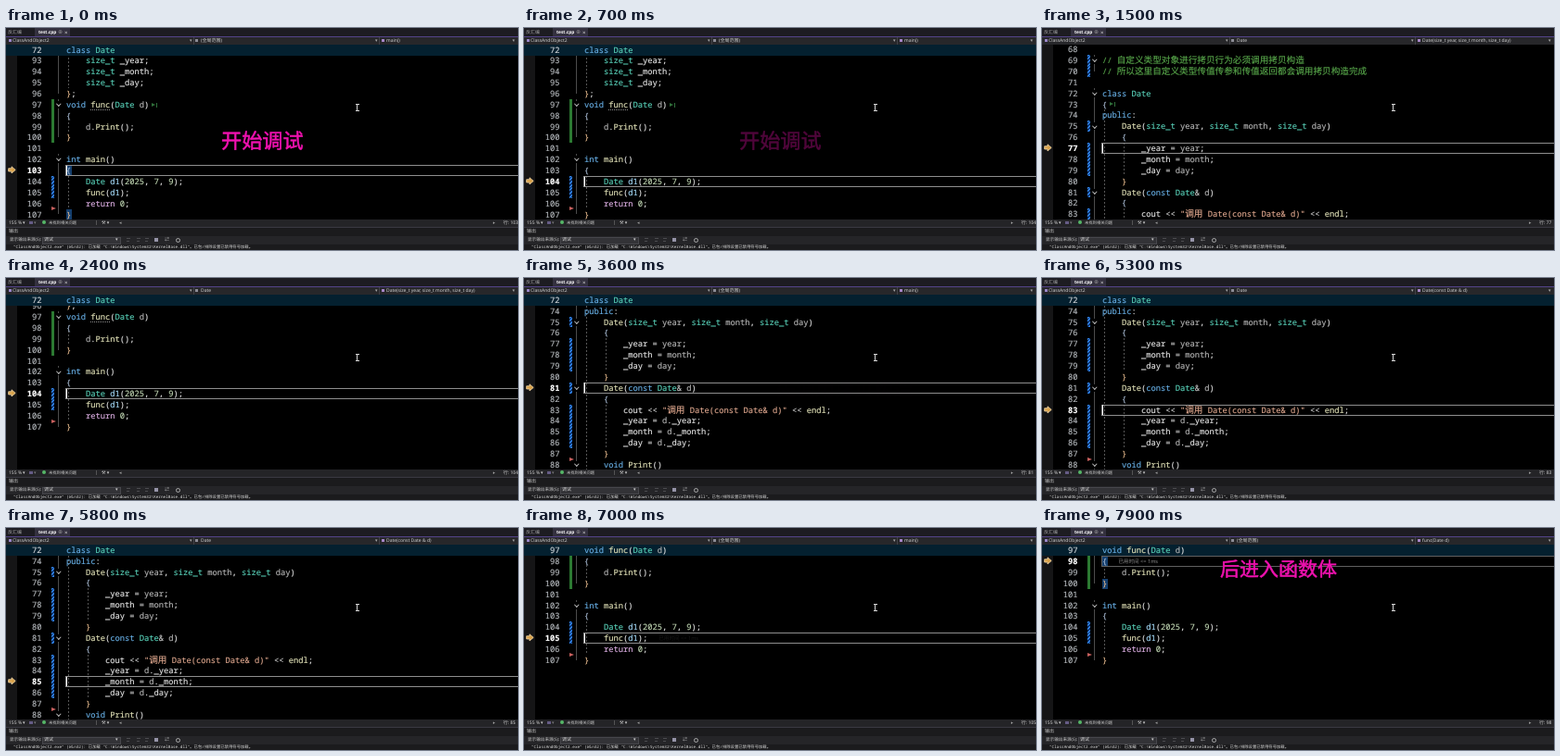
These frames come from a looping animation (552 px wide and 240 px high, 8000 ms). An HTML page:

```html
<!DOCTYPE html>
<html lang="zh-CN">
<head>
<meta charset="utf-8">
<title>Debugger stepping</title>
<style>
html, body { margin: 0; width: 100%; height: 100%; overflow: hidden; background: #000; }
#stage { position: relative; width: 552px; height: 240px; overflow: hidden; background: #000;
  text-rendering: geometricPrecision; -webkit-font-smoothing: antialiased; }
#stage div { position: absolute; white-space: pre; }
.code { font: 8.75px/13.8px "Noto Sans Mono", "Noto Sans CJK SC", monospace; color: #e4e4e4;
  -webkit-text-stroke: .15px; }
.cjk { font-size: 9.65px; line-height: 1px; }
.ui { font: 5px/8px "Noto Sans", "Noto Sans CJK SC", sans-serif; color: #cfcfcf; }
.num { left: 12px; width: 26.5px; text-align: right; color: #b4b8bc; }
.num.on { color: #fff; font-weight: 700; }
.kw { color: #67aee4; } .ty { color: #58d0b8; } .fn { color: #e2e2b8; } .ret { color: #dcaee2; }
.str { color: #dca58c; } .nu { color: #c2d8b4; } .com { color: #57a64a; } .par { color: #b4b4b4; }
.var { color: #a6dcfa; } .open { color: #a9bcd4; } .close { color: #e3b88c; } .op { color: #c4c4c4; }
.mod { left: 49px; width: 3px; background: repeating-linear-gradient(135deg, #2f7fe0 0 1.5px, #0c2f66 1.5px 2.6px); }
.mod.saved { background: #2c7a32; }
.out { left: 56px; width: 1px; background: #4c4c4c; }
.guide { width: 1px; background: repeating-linear-gradient(#565656 0 2px, transparent 2px 4px); }
.cap { color: #f012b0; font-family: "Noto Sans CJK SC", "Noto Sans", sans-serif; font-weight: 500;
  line-height: 26px; -webkit-text-stroke: .45px; text-shadow: 0 0 1px #50063c; }
</style>
</head>
<body>
<div id="stage"></div>
<script>
const LOOP = 8000, ROW = 11.87, COL = 5.25, X0 = 65, FIRST = 68;
const stage = document.getElementById('stage');

const source = `
// 自定义类型对象进行拷贝行为必须调用拷贝构造
// 所以这里自定义类型传值传参和传值返回都会调用拷贝构造完成

class Date
{
public:
    Date(size_t year, size_t month, size_t day)
    {
        _year = year;
        _month = month;
        _day = day;
    }
    Date(const Date& d)
    {
        cout << "调用 Date(const Date& d)" << endl;
        _year = d._year;
        _month = d._month;
        _day = d._day;
    }
    void Print()
    {
        cout << _year << endl;
    }
private:
    size_t _year;
    size_t _month;
    size_t _day;
};
void func(Date d)
{
    d.Print();
}

int main()
{
    Date d1(2025, 7, 9);
    func(d1);
    return 0;
}`.split('\n');

// view: anchor line, its centre y, sticky header line
const views = {
  main: [93, 35.3, 72], ctor: [68, 23.2, 0], back: [97, 42, 72],
  copy: [74, 35.6, 72], body: [98, 36, 97]
};

// start time, current line, view, scope
const steps = [
  [0, 103, 'main', 'main'], [700, 104, 'main', 'main'],
  [1000, 75, 'ctor', 'ctor'], [1300, 77, 'ctor', 'ctor'], [1600, 78, 'ctor', 'ctor'],
  [1800, 79, 'ctor', 'ctor'], [2000, 80, 'ctor', 'ctor'],
  [2200, 104, 'back', 'main'], [2800, 105, 'back', 'main'],
  [3400, 81, 'copy', 'copy'], [5300, 83, 'copy', 'copy'], [5500, 84, 'copy', 'copy'],
  [5700, 85, 'copy', 'copy'], [6000, 86, 'copy', 'copy'], [6200, 87, 'copy', 'copy'],
  [6600, 105, 'body', 'main'], [7200, 98, 'body', 'func']
];

const scopes = {
  main: ['(全局范围)', 'main()'], func: ['(全局范围)', 'func(Date d)'],
  ctor: ['Date', 'Date(size_t year, size_t month, size_t day)'],
  copy: ['Date', 'Date(const Date & d)']
};

// text, x, centre y, size, from, to
const captions = [
  ['开始调试', 232, 121, 22.2, -500, 800],
  ['先调用拷贝构造', 272, 120, 21, 3600, 5000],
  ['后进入函数体', 192, 43.5, 21, 7400, 8600]
];
const braces = { 103: 107, 98: 100 };

function add(parent, cls, x, y, w, h, text, css) {
  const el = document.createElement('div');
  el.className = cls;
  const put = (key, v) => { if (v != null) el.style[key] = v + 'px'; };
  put('left', x); put('top', y); put('width', w); put('height', h);
  if (text) el.textContent = text;
  if (css) el.style.cssText += css;
  parent.append(el);
  return el;
}
const fill = (x, y, w, h, color, parent = stage) => add(parent, '', x, y, w, h, '', 'background:' + color);
const label = (x, mid, text, css) => add(stage, 'ui', x, mid - 4, null, null, text, css);
const clamp = v => Math.max(0, Math.min(1, v));
const span = (cls, s) => `<span class="${cls}">${s}</span>`;
const escape = s => s.replace(/&/g, '&amp;').replace(/</g, '&lt;');
const wide = s => s.replace(/[\u4e00-\u9fff]+/g, m => span('cjk', m));

function classify(word, line, at) {
  const next = line[at + word.length];
  if (/^(class|public|private|const|void|int)$/.test(word)) return 'kw';
  if (word === 'return') return 'ret';
  if (word === 'size_t' || word === 'Date' && next !== '(') return 'ty';
  if (next === '(' && word !== 'd1' || word === 'endl') return 'fn';
  if (word === 'd1') return 'var';
  if (/^(d|year|month|day)$/.test(word)) return 'par';
  return /^\d/.test(word) ? 'nu' : '';
}

function paint(line) {
  return line.replace(/\/\/.*|".*?"|\w+|[{}]|[<&=]+/g, (m, at) => {
    const cls = m.startsWith('//') ? 'com' : m[0] === '"' ? 'str' :
      m === '{' ? 'open' : m === '}' ? 'close' : /\w/.test(m) ? classify(m, line, at) : 'op';
    return span(cls, wide(escape(m)));
  });
}

// editor
const editor = add(stage, '', 0, 18, 552, 188.5, '', 'overflow:hidden');
fill(0, 0, 12, 189, '#151516', editor);
const sheet = add(editor, '', 0, 0, 552, 480);
const rowTop = n => (n - FIRST) * ROW;

const block = (cls, a, b, x) => add(sheet, cls, x, rowTop(a), null, (b - a + 1) * ROW);
[[69, 70], [75, 75], [77, 79], [81, 81], [83, 86], [104, 105]].forEach(([a, b]) => block('mod', a, b));
block('mod saved', 97, 100);
[[69, 70], [72, 96], [97, 100], [102, 107]].forEach(([a, b]) => block('out', a, b - 0.5));
[[74, 95, 67], [98.8, 99, 67], [104, 106, 67], [77, 79, 88], [83, 86, 88], [90, 90, 88]]
  .forEach(([a, b, x]) => block('guide', a, b, x));

const marks = [0, 1].map(() => fill(X0 - 0.5, 0, 6, 11, '#153f6e', sheet));
const numbers = source.map((line, i) => {
  const y = i * ROW;
  add(sheet, 'code', X0, y, null, ROW).innerHTML = paint(line);
  return add(sheet, 'code num', null, y, null, ROW, String(FIRST + i));
});

[69, 72, 75, 81, 88, 97, 102].forEach(n => {
  fill(53, rowTop(n) + 2, 7, 8, '#000', sheet);
  add(sheet, '', 55, rowTop(n) + 3.2, 2.6, 2.6, '',
    'border:solid #b8b8b8;border-width:0 1px 1px 0;transform:rotate(45deg)');
});
[87, 106].forEach(n => add(sheet, '', 49, rowTop(n) + ROW - 2.2, 0, 0, '',
  'border:solid transparent;border-width:2.8px 0 2.8px 5px;border-left-color:#c8605e'));
add(sheet, '', X0 + 5 * COL, rowTop(97) + 11, 4 * COL, 0, '', 'border-top:1px dotted #8a8a8a');

const box = add(sheet, '', 64, 0, 492, 10, '', 'border:1px solid');
const caret = fill(64.5, 0, 1.2, 10.5, '#fff', sheet);
const tip = add(sheet, 'ui', 0, 0, null, null, '已用时间 <= 1ms', 'color:#8c8c8c;font-size:5.6px');
const runHere = add(sheet, '', 0, 0, 7, 6);
add(runHere, '', 0, 0, 0, 0, '', 'border:solid transparent;border-width:2.5px 0 2.5px 4px;border-left-color:#2f6f3a');
fill(5, 0, 1, 5, '#2f6f3a', runHere);

const arrow = add(sheet, '', 2, 0, 9, 9);
arrow.innerHTML = '<svg width="9" height="9" style="display:block"><path d="M.7 2.8H4V.8L8.2 4.4 4 8V6H.7Z" fill="#d9a24a" stroke="#f6dcae" stroke-width=".8"/></svg>';

const sticky = add(editor, 'code', 0, 0, 552, 11.8, '', 'background:#04202f;overflow:hidden');
const stickyNum = add(sticky, 'code num', null, 0, null, ROW, '', 'color:#d0d4d8');
const stickyText = add(sticky, 'code', X0, 0, null, ROW);

// tab strip and navigation bar
fill(0, 0, 552, 9, '#1d1c22');
fill(31, 0, 38, 9, '#34313f');
fill(0, 8.5, 552, 1, '#54458a');
label(2, 4.5, '反汇编', 'color:#a4a4a4');
label(35, 4.5, 'test.cpp', 'color:#fff;font-weight:700;font-size:4.8px');
label(56, 4.5, '⊕', 'color:#aaa');
label(63, 4.5, '×', 'color:#ddd;font-size:6px');
fill(0, 9.5, 552, 8.5, '#27272a');
label(7, 14, 'ClassAndObject2');
[[2.5, '#9a86c8'], [204, '#8b8b94'], [404.5, '#a686c8']].forEach(([x, c]) => fill(x, 12.2, 3.2, 3.2, c));
[199, 399, 547].forEach(x => label(x - 1, 14, '▾', 'color:#aaa'));
[201.5, 401.5].forEach(x => fill(x, 9.5, 1, 8.5, '#414146'));
const scopeText = label(210, 14, '');
const memberText = label(410, 14, '');

// editor status row
fill(0, 206.5, 552, 8.5, '#242427');
label(3, 210.5, '155 %');
label(18, 210.5, '▾');
fill(25, 208.7, 3.5, 3.5, '#655c86');
label(30, 210.5, '▾', 'color:#777');
add(stage, '', 39, 208.3, 4, 4, '', 'background:#55b767;border-radius:50%');
label(46, 210.5, '未找到相关问题', 'font-size:4.3px');
fill(97, 208, 1, 5, '#555');
label(103, 210.5, '⚒ ▾');
label(122, 210.5, '◂', 'color:#999');
label(525, 210.5, '▸', 'color:#999');
const position = label(536, 210.5, '');

// output panel
fill(0, 215, 552, 25, '#1b1b1d');
fill(0, 215, 552, 1, '#3a3942');
label(3, 220, '输出');
fill(0, 224.5, 552, 9, '#252528');
label(4, 229, '显示输出来源(S):', 'font-size:4.6px');
add(stage, '', 39, 225.5, 83, 6, '', 'background:#333337;border:1px solid #47474c');
label(41, 229, '调试');
label(118, 229, '▾');
[130, 141, 150].forEach(x => {
  fill(x, 227, 4, 1, '#4c4c50');
  fill(x, 229.5, 3, 1, '#4c4c50');
});
fill(160, 227, 4, 4, '#9694a8');
label(171, 229, '⇄', 'color:#bbb');
add(stage, '', 183, 226.8, 3, 3, '', 'border:1px solid #aaa;border-radius:50%');
label(8, 237, '"ClassAndObject2.exe" (Win32): 已加载 "C:\\Windows\\System32\\KernelBase.dll"。已包/排除设置已禁用符号加载。',
  'font-family:"Noto Sans Mono","Noto Sans CJK SC",monospace;font-size:4.35px;color:#e0e0e0');

// I-beam pointer
[[378, 82.5, 1, 7], [376.5, 82, 4, 1], [376.5, 89, 4, 1]].forEach(r => fill(...r, '#d8d8d8'));

const titles = captions.map(([text, x, y, size]) =>
  add(stage, 'cap', x, y - 13, null, null, text, `font-size:${size}px`));

const stepAt = t => steps.filter(s => s[0] <= Math.max(0, t)).pop();
const setText = (el, s) => { if (el.textContent !== s) el.textContent = s; };
const show = (el, on) => { el.style.visibility = on ? 'visible' : 'hidden'; };
let drawn = null;

function place(step) {
  const [, line, viewName] = step;
  const [anchor, mid, header] = views[viewName];
  const y = rowTop(line);
  sheet.style.top = mid - 18 - ROW / 2 - rowTop(anchor) + 'px';
  show(sticky, header);
  if (header) {
    setText(stickyNum, String(header));
    stickyText.innerHTML = paint(source[header - FIRST]);
  }
  numbers.forEach((el, i) => el.classList.toggle('on', i + FIRST === line));
  box.style.top = y + 0.2 + 'px';
  caret.style.top = y + 0.7 + 'px';
  arrow.style.top = y + 1 + 'px';
  tip.style.top = y + 2.2 + 'px';
  tip.style.left = X0 + source[line - FIRST].length * COL + 12 + 'px';
  marks.forEach((el, i) => {
    show(el, braces[line]);
    if (braces[line]) el.style.top = rowTop(i ? braces[line] : line) + 0.8 + 'px';
  });
  const hover = { main: 97, ctor: 73 }[viewName];
  show(runHere, hover);
  if (hover) {
    runHere.style.left = X0 + source[hover - FIRST].length * COL + 3 + 'px';
    runHere.style.top = rowTop(hover) + 3.8 + 'px';
  }
  setText(position, '行: ' + line);
}

function render(t) {
  const step = stepAt(t), age = t - step[0];
  if (step !== drawn) place(drawn = step);
  const [scope, member] = scopes[stepAt(t - 350)[3]];
  setText(scopeText, scope);
  setText(memberText, member);
  const tipAlpha = step[0] ? clamp((age - 350) / 300) : 0;
  tip.style.opacity = tipAlpha;
  box.style.borderColor = tipAlpha > 0.5 ? '#606060' : '#8e8e8e';
  show(caret, Math.floor(age / 530) % 2 === 0);
  captions.forEach(([, , , , from, to], i) => {
    titles[i].style.opacity = clamp((t - from) / 200) * clamp((to - t) / 300);
  });
}

const start = performance.now();
function tick() {
  render((performance.now() - start) % LOOP);
  requestAnimationFrame(tick);
}
tick();
</script>
</body>
</html>
```
